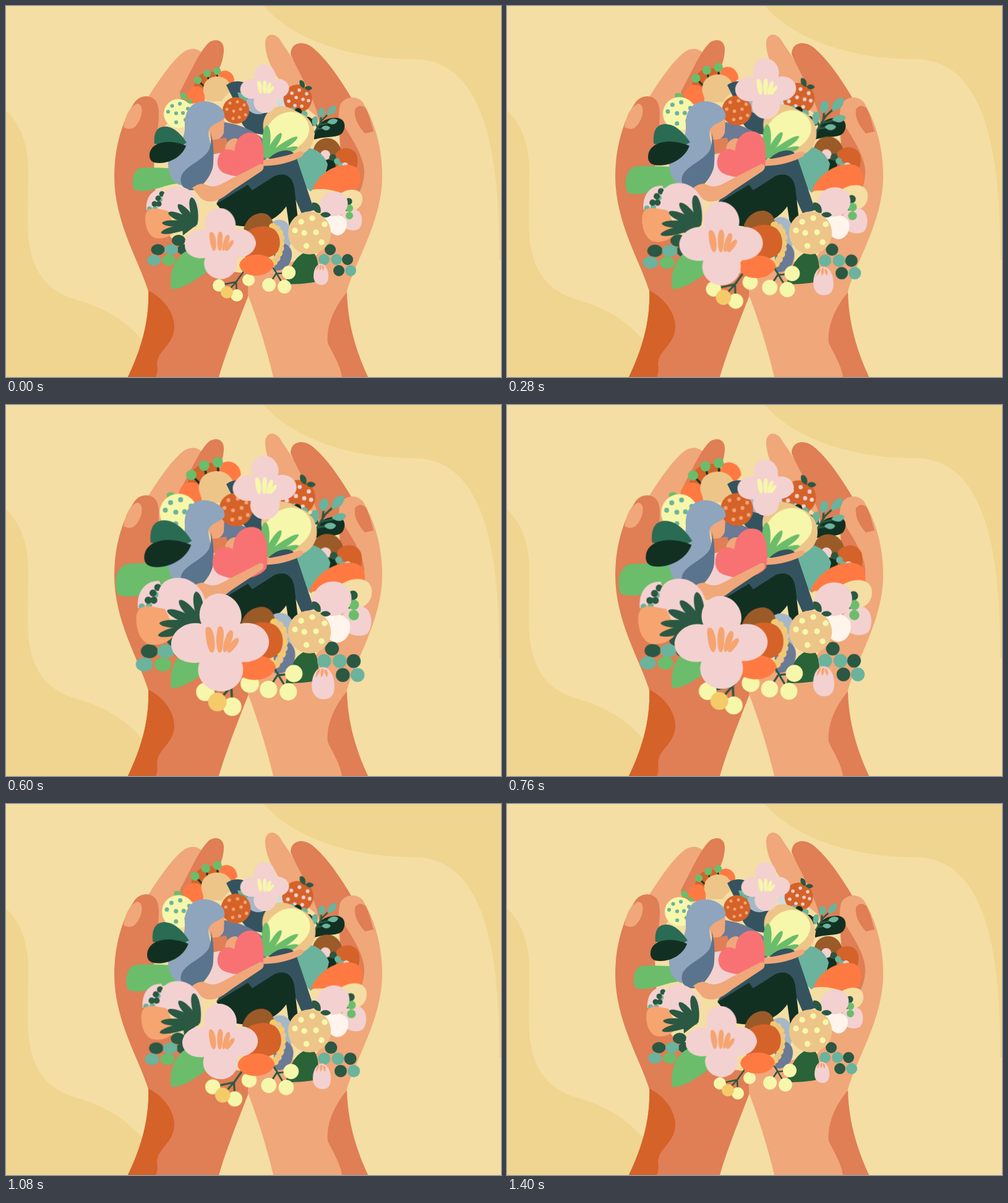
Write an HTML page that moves like this. It is 800 px wide and 600 px high and loops after 1.44 s.

```html
<!DOCTYPE html>
<html lang="en">
<head>
<meta charset="utf-8">
<title>Flowers in open hands</title>
<style>
html, body { margin: 0; width: 100%; height: 100%; overflow: hidden; background: #f4dea3; }
svg { display: block; width: 100vw; height: 100vh; }
path, ellipse, circle { fill: currentColor; }
.dot, .stem { fill: none; stroke: currentColor; stroke-linecap: round; }
.stem { stroke-width: 2.5; }

.sand { color: #efd58f; } .cream { color: #f4dea3; } .lemon { color: #f7f7ab; }
.amber { color: #f5cb6a; } .tan { color: #edc588; } .skin { color: #f0a77a; }
.clay { color: #e07e55; } .rust { color: #d56229; } .brown { color: #9a5b28; }
.orange { color: #ff7a42; } .peach { color: #f6a470; } .pink { color: #f3d1d0; }
.rose { color: #f87274; } .white { color: #fff5ec; } .green { color: #6bbd6b; }
.teal { color: #6bb39c; } .pine { color: #2a5842; } .jade { color: #2a6b53; }
.moss { color: #2a6338; } .night { color: #123022; } .navy { color: #34535e; }
.slate { color: #6b7a95; } .mist { color: #a5b8c8; } .hair { color: #8fa5bd; }
.lock { color: #5b748d; }

/* each part swells from its root, at 25 steps a second */
.main { animation: main 1440ms infinite; }
.bloom { animation: bloom 1440ms infinite; }
.top { animation: top 1440ms infinite; }
.sprig { animation: sprig 1440ms infinite; }
.love { animation: love 1440ms infinite; }
.bud { animation: bud 1440ms infinite; }
.leaf { animation: leaf 1440ms infinite; }
.seed { animation: seed 1440ms infinite; }
@keyframes main {
  0% { transform: scale(1); animation-timing-function: steps(16); }
  44.444% { transform: scale(var(--s)); animation-timing-function: steps(19); }
  97.222%, to { transform: scale(1); }
}
@keyframes bloom {
  0% { transform: scale(1); animation-timing-function: steps(16); }
  44.444% { transform: scale(var(--s)); animation-timing-function: steps(13); }
  80.556%, to { transform: scale(1); }
}
@keyframes top {
  0% { transform: scale(1); animation-timing-function: steps(12); }
  33.333% { transform: scale(var(--s)); animation-timing-function: steps(11); }
  63.889%, to { transform: scale(1); }
}
@keyframes sprig {
  0% { transform: scale(1); animation-timing-function: steps(11); }
  30.556% { transform: scale(var(--s)); animation-timing-function: steps(17); }
  77.778%, to { transform: scale(1); }
}
@keyframes love {
  0%, 11.111% { transform: scale(1); animation-timing-function: steps(11); }
  41.667% { transform: scale(var(--s)); animation-timing-function: steps(12); }
  75%, to { transform: scale(1); }
}
@keyframes bud {
  0% { transform: scale(1); animation-timing-function: steps(12); }
  33.333% { transform: scale(var(--s)); animation-timing-function: steps(23); }
  97.222%, to { transform: scale(1); }
}
@keyframes leaf {
  0% { transform: scale(1); animation-timing-function: steps(16); }
  44.444% { transform: scale(var(--s)); animation-timing-function: steps(17); }
  91.667%, to { transform: scale(1); }
}
@keyframes seed {
  0% { transform: scale(1); animation-timing-function: steps(15); }
  41.667% { transform: scale(var(--s)); animation-timing-function: steps(15); }
  83.333%, to { transform: scale(1); }
}
</style>
</head>
<body>
<svg viewBox="0 0 800 600" preserveAspectRatio="none">
<defs>
  <path id="petals" d="M-38-38C-50-64-34-100-2-100S52-64 41-38C72-46 100-26 100-1S74 42 44 40C55 66 36 100 2 100S-53 68-42 41C-74 46-100 28-100 3S-70-46-38-38Z"/>
  <g id="stamens">
    <path d="M-29-30C-22-36-15-28-12-10C-10 4-10 20-17 21C-26 20-32-20-29-30Z"/>
    <path d="M-3-32C4-36 9-28 7-10C6 8 5 21-1 21C-9 21-10-22-3-32Z"/>
    <path d="M21-25C28-25 28-16 24-5C19 10 13 22 8 20C2 16 12-22 21-25Z"/>
    <path d="M37-9C41-4 35 5 29 12C22 21 18 23 15 19C13 13 28-12 37-9Z"/>
  </g>
  <path id="frond" d="M-2 0C-6-14-9-46-1-50C7-48 8-16 2 0Z"/>
</defs>

<g class="sand">
  <path d="M417 0C455 45 540 86 660 86C750 87 799 180 797 410H800V0Z"/>
  <path d="M0 169C25 192 36 228 36 265L35 350C36 420 58 457 110 474C160 488 190 506 225 545L240 600H0Z"/>
</g>

<!-- left hand -->
<path class="skin" d="M222 160C240 130 265 92 285 76C296 67 309 67 318 77L292 150L248 206L236 190Z"/>
<path class="clay" d="M352 72C353 56 340 51 328 59C312 74 298 108 281 139L285 165L325 128C344 110 351 90 352 72Z"/>
<path class="clay" d="M230 461C215 412 175 350 175 275C175 230 188 185 207 157C216 143 237 142 244 157C251 173 244 205 240 235C238 275 240 310 252 350C275 400 330 430 393 432V465C377 507 357 555 344 600H197C218 556 232 510 230 461Z"/>
<path class="skin" d="M190 196C192 180 199 163 212 158C220 159 221 168 218 179C213 193 205 204 190 196Z"/>
<path class="rust" d="M230 460C257 474 272 498 272 519C271 549 245 556 244 579Q246 592 242 600H197C218 556 232 510 230 460Z"/>

<!-- right hand -->
<path class="skin" d="M419 64C417 43 436 40 445 58L463 85L506 150V182L480 160C440 125 421 92 419 64Z"/>
<path class="clay" d="M460 78C460 59 479 55 494 66C517 84 540 118 559 150L540 195L506 190C505 160 473 108 460 78Z"/>
<path class="skin" d="M391 430V467C409 515 422 558 432 600H585C564 555 552 510 550 465C561 418 608 350 608 275C608 230 597 190 577 156C566 143 546 147 540 160C535 182 538 210 541 240C544 300 530 370 500 405Z"/>
<path class="clay" d="M538 180C552 205 580 240 579 271C577 296 570 310 545 322Z"/>
<path class="clay" d="M564 167Q571 157 581 165C588 178 590 190 594 203L580 206C569 194 562 180 564 167Z"/>
<path class="clay" d="M551 463C529 489 517 520 520 545C528 562 540 580 543 600H585C564 555 552 510 551 463Z"/>

<!-- upper left -->
<g class="main" style="--s:1.34;transform-origin:336px 145px">
  <path class="rust" d="M304 131C306 111 324 102 342 108L350 140L315 145Z"/>
  <path class="orange" d="M345 107C356 100 369 108 369 121L360 131L340 125Z"/>
  <path class="orange" d="M293 151C291 137 300 129 309 130C318 130 323 137 321 155L300 158Z"/>
</g>
<g class="main" style="--s:1.4;transform-origin:338px 138px">
  <path class="stem night" stroke-width="2" d="M310 120L320 130M325 109L329 126M341 105L342 124"/>
  <path class="dot green" stroke-width="12.4" d="M310 120h0M325 109h0M341 105h0"/>
  <path class="green" d="M281 142C288 137 294 143 293 151C285 153 281 149 281 142ZM292 154Q300 146 302 156Q296 161 292 154Z"/>
</g>
<g class="main tan" style="--s:1.29;transform-origin:345px 140px">
  <path d="M319 139C317 122 329 114 342 114S365 124 364 139C356 143 351 149 349 154H324Z"/>
</g>
<g class="main" style="--s:1.32;transform-origin:277px 174px">
  <circle class="lemon" cx="278.500" cy="174" r="23.5"/>
  <path class="dot teal" stroke-width="6.2" d="M281 158h0M268.500 161.500h0M262 171h0M275 173.500h0M286 173h0M275 188h0M294 166h0M290 184h0"/>
</g>

<!-- behind the upper flower -->
<path class="navy" d="M356 128C370 117 390 120 405 140L440 178L416 208C394 206 382 198 378 180L366 148Z"/>
<path class="teal" d="M374 140C382 138 390 146 392 155L378 152Z"/>
<ellipse class="mist" cx="408" cy="158" rx="20" ry="17"/>
<circle cx="446" cy="156" r="9" color="#d5d9e0"/>

<!-- upper right -->
<g class="main" style="--s:1.24;transform-origin:471px 152px">
  <circle class="rust" cx="471.500" cy="150" r="23"/>
  <path class="dot pink" stroke-width="5.6" d="M462 141h0M474 136h0M486 142h0M457 154h0M469 148h0M480 151h0M489 153h0M478 162h0M467 161h0"/>
  <path class="pine" d="M475 120C481 119 485 126 482 133C475 131 473 125 475 120ZM483 133C485 127 493 129 495 133C491 138 486 137 483 133Z"/>
</g>
<g class="main" style="--s:1.2;transform-origin:482px 192px">
  <path class="dot teal" stroke-width="11" d="M463 169h0M482 175h0"/>
  <path class="dot night" stroke-width="12" d="M472 171h0M488 185h0M495 188h0"/>
</g>
<path class="night" d="M498 216C498 193 515 179 536 181C549 183 550 197 543 206C534 214 517 210 498 216Z"/>
<g class="sprig" style="--s:1.49;transform-origin:499px 202px">
  <path class="stem pine" stroke-width="1.8" d="M499 204L511 184L526 170M510 173L508 190M500 186L503 196M508 192L526 188M503 199L517 197"/>
  <g class="teal">
    <path d="M505 178C502 168 508 164 513 165C517 171 515 178 509 180ZM519 177C518 165 526 161 533 161C535 170 529 177 519 177ZM495 191C493 180 498 177 503 179C506 187 502 193 498 195Z"/>
    <path d="M519 188C524 181 533 181 536 185C533 193 525 193 519 188ZM510 197C514 192 522 193 524 197C521 203 513 202 510 197Z"/>
  </g>
</g>

<!-- right -->
<g class="main" style="--s:1.14;transform-origin:515px 255px">
  <path class="brown" d="M497 231C502 214 518 211 529 216C538 221 542 230 543 242L515 255Z"/>
  <path class="rust" d="M533 238C544 226 561 228 567 241C570 253 567 264 562 268L530 268Z"/>
  <path class="night" d="M508 246L532 250L533 266L518 270Z"/>
  <circle class="pink" cx="516" cy="241" r="8"/>
  <path class="dot pine" stroke-width="11" d="M528 245h0"/>
  <path class="dot teal" stroke-width="10" d="M535 251h0M541 258h0"/>
  <path class="dot pink" stroke-width="10" d="M548 258h0"/>
</g>
<path class="teal main" style="--s:1.13;transform-origin:485px 265px" d="M466 238C484 222 510 230 520 256C517 275 506 289 492 300C480 290 468 268 466 238Z"/>
<path class="orange main" style="--s:1.19;transform-origin:529px 268px" d="M495 297C505 273 527 257 552 257C568 257 574 269 572 283C568 301 555 304 540 302C523 296 510 295 495 297Z"/>
<g class="main" style="--s:1.42;transform-origin:537px 337px">
  <path class="cream" d="M538 305C553 293 576 294 576 312C576 326 564 333 547 334Z"/>
  <path class="pink" d="M541 341C546 329 560 325 569 331C577 337 577 353 571 360C562 366 550 362 545 356Z"/>
  <path class="white" d="M513 339C525 333 544 336 550 347C553 358 547 370 536 371C524 370 515 354 513 339Z"/>
  <path class="dot pine" stroke-width="11" d="M554 316h0M550 326h0"/>
  <path class="dot green" stroke-width="12" d="M555 327h0M555 339h0"/>
  <path class="pink" d="M506 329C506 309 518 300 532 300C546 301 554 311 552 323C549 336 539 340 528 340C518 340 511 334 506 329Z"/>
</g>

<!-- left leaf -->
<path class="green leaf" style="--s:1.44;transform-origin:272px 274px" d="M207 297C202 284 205 266 217 262C234 260 258 262 280 263L278 287C254 289 230 305 207 297Z"/>

<!-- figure -->
<path class="navy" d="M340 319L358 292L415 258C430 242 458 234 470 247L498 330L478 336L460 295L420 310Z"/>
<path class="night" d="M340 320L391 289L398 298L434 275C452 268 463 276 466 294L472 346L458 358L453 324C435 350 400 362 368 354Z"/>
<path class="slate" d="M338 186C378 189 408 204 423 224C427 238 423 250 412 254L345 240Z"/>
<g class="main" style="--s:1.09;transform-origin:450px 235px">
  <path class="tan" d="M416 200C413 180 425 164 443 162C459 162 467 170 477 174C493 181 500 198 498 213C495 230 484 239 470 242L425 247Z"/>
  <path class="lemon" d="M417 245C412 220 417 190 442 176C467 163 491 178 490 201C488 223 460 241 417 245Z"/>
  <g class="green" transform="translate(419 245)">
    <use href="#frond" transform="rotate(4) scale(1.1 1.04)"/>
    <use href="#frond" transform="rotate(34) scale(.85 .95)"/>
    <use href="#frond" transform="rotate(58) scale(.85 1.24)"/>
    <use href="#frond" transform="rotate(73) scale(.8 1.1)"/>
  </g>
</g>
<path class="navy" d="M424 247C437 234 456 229 465 238L450 250Z"/>
<path class="skin" d="M408 250C436 247 461 240 476 235C483 236 482 242 475 245C455 256 429 259 408 259Z"/>
<path class="clay" d="M331 216L356 213L362 238L334 243Z"/>
<path class="pink" d="M334 240C355 234 390 235 412 253C390 276 355 296 324 291C325 272 335 261 334 240Z"/>
<path class="skin" d="M354 232C354 220 364 213 372 214C380 218 377 232 370 236Z"/>
<path class="skin" d="M327 197L353 181L352 205C348 216 340 218 330 214Z"/>
<g class="main" style="--s:1.28;transform-origin:372px 169px">
  <circle class="rust" cx="371.500" cy="169" r="21.5"/>
  <path class="dot peach" stroke-width="5" d="M362 157h0M374 155h0M385 160h0M357 167h0M368 170h0M379 167h0M367 182h0M377 180h0M387 176h0"/>
</g>
<path class="hair" d="M289 195C287 166 304 153 322 154C344 156 356 170 353 181C346 189 333 190 328 200C325 215 336 230 335 255C333 275 315 298 300 298C290 298 284 290 284 290C269 287 261 270 262 250C265 230 290 225 289 195Z"/>
<path class="lock" d="M331 205C337 225 336 250 334 262C328 281 312 298 300 298C288 298 280 288 283 276C289 258 318 251 328 233C332 222 332 212 331 205Z"/>
<path class="rose love" style="--s:1.19;transform-origin:384px 244px" d="M371 224C376 207 393 200 406 208C417 217 418 239 415 261C401 278 370 279 350 269C337 260 341 240 351 234C358 230 365 232 369 235Z"/>
<path class="skin" d="M301 294C310 287 318 286 323 289C336 296 349 288 361 281L410 256C418 254 418 263 413 267L365 299C348 313 332 322 316 312Z"/>

<g class="main" style="--s:1.3;transform-origin:262px 225px">
  <path class="jade" d="M240 223C238 202 246 194 259 195C273 196 285 210 292 221L275 230Z"/>
  <path class="night" d="M232 244C231 229 243 221 259 220C271 219 284 223 291 226C285 243 266 254 248 254C238 254 233 251 232 244Z"/>
</g>

<!-- lower left -->
<g class="seed" style="--s:1.25;transform-origin:301px 377px">
  <g class="pine"><ellipse cx="245.500" cy="394" rx="11" ry="9"/><ellipse cx="279" cy="379" rx="11" ry="9"/><ellipse cx="288" cy="394" rx="11" ry="9"/></g>
  <g class="teal"><ellipse cx="267" cy="394" rx="11" ry="9"/><ellipse cx="239" cy="411" rx="11" ry="9"/></g>
  <ellipse class="green" cx="263" cy="411" rx="11" ry="9"/>
</g>
<path class="green" d="M267 458C262 428 278 398 298 394L350 418C324 424 297 458 267 458Z"/>
<g class="main" style="--s:1.31;transform-origin:275px 335px">
  <path class="pink" d="M227 330C225 309 237 295 254 296L270 340Z"/>
  <path class="dot teal" stroke-width="8" d="M249 313h0M232 328h0M241 327h0"/>
  <path class="dot pine" stroke-width="9" d="M252 304h0M246 311h0M240 320h0M247 320h0"/>
  <path class="pink" d="M253 309C257 294 271 290 286 293C302 298 313 313 312 330C309 346 288 352 270 343C259 336 252 321 253 309Z"/>
  <path class="peach" d="M225 343C225 330 233 326 245 328L261 331L275 360C268 374 251 378 240 375C229 370 225 356 225 343Z"/>
</g>
<g class="main pine" style="--s:1.26;transform-origin:270px 342px">
  <g transform="translate(307 354)">
    <use href="#frond" transform="rotate(-8) scale(1.05 .9)"/>
    <use href="#frond" transform="rotate(-40) scale(1 .88)"/>
    <use href="#frond" transform="rotate(-65) scale(1 .98)"/>
    <use href="#frond" transform="rotate(-86) scale(.9 1.1)"/>
    <use href="#frond" transform="rotate(-102) scale(.9 1.16)"/>
  </g>
  <path d="M308 335V354L286 371L284 350L298 338Z"/>
</g>

<!-- lower right -->
<path class="moss" d="M452 450C458 420 471 399 490 397C502 397 506 412 505 445C490 449 470 450 452 450Z"/>
<g class="main" style="--s:1.27;transform-origin:513px 394px">
  <path class="dot teal" stroke-width="18" d="M514 410h0M534 410h0M557 428h0"/>
  <path class="dot pine" stroke-width="18" d="M524 394h0M552 410h0M538 428h0"/>
</g>
<g class="bud" style="--s:1.61;transform-origin:502.500px 404px">
  <path class="pink" d="M497 437C497 424 503 417 509 417S521 425 521 437S515 451 509 451S497 446 497 437Z"/>
  <path class="peach" d="M501 428Q502 419 506 419Q505 424 501 428ZM507 428Q505 419 509 418Q511 424 507 428ZM513 428Q509 421 511 419Q516 422 513 428Z"/>
</g>

<!-- bottom centre -->
<g class="main" style="--s:1.21;transform-origin:435px 395px">
  <path class="mist" d="M428 351C440 341 457 346 460 362C464 378 459 392 452 400L430 390Z"/>
  <path class="slate" d="M432 384C446 379 463 386 462 403C461 420 448 430 434 427Z"/>
</g>
<g class="main" style="--s:1.53;transform-origin:388px 428px">
  <path class="stem pine" stroke-width="2" d="M388 424L372 446M344 452L372 446L357 463M372 446L373 466"/>
  <path class="dot lemon" stroke-width="20" d="M344 452h0M373 468h0M392 443h0"/>
  <path class="dot amber" stroke-width="20" d="M357 463h0"/>
</g>
<g class="main" style="--s:1.3;transform-origin:428px 419px">
  <path class="stem pine" d="M432 424L438 433L457 431M426 449L437 432L449 452"/>
  <path class="dot lemon" stroke-width="22" d="M457 431h0M425 451h0M450 454h0"/>
</g>
<g class="main" style="--s:1.18;transform-origin:415px 385px">
  <path class="brown" d="M384 361C389 341 404 334 416 335C426 337 432 345 432 357L405 372Z"/>
  <path class="dot amber" stroke-width="12" d="M431 357h0M442 367h0M444 384h0M441 400h0M433 414h0"/>
  <path class="dot tan" stroke-width="11" d="M438 360h0M445 375h0M444 392h0M438 408h0"/>
  <path class="rust" d="M385 370C396 356 420 352 433 361C444 370 445 386 439 397C429 410 406 410 387 409Z"/>
  <path class="orange" d="M377 419C379 408 392 402 406 402C420 402 432 409 433 419C429 430 417 436 404 436C390 436 379 430 377 419Z"/>
</g>

<circle class="tan" cx="490.500" cy="367" r="34.7"/>
<path class="dot lemon" stroke-width="9.5" d="M477 349h0M495 343h0M515 353h0M467 363h0M482 367h0M501 366h0M485.500 388h0M510 382h0"/>
<path class="pine" d="M495 318C504 316 511 325 508 335C499 335 494 328 495 318ZM508 337C514 331 522 333 525 338C520 344 512 343 508 337Z"/>

<!-- large blooms -->
<g class="bloom" style="--s:1.4;transform-origin:346px 384px">
  <g transform="translate(346 384) scale(.575)">
    <use href="#petals" class="pink"/><use href="#stamens" class="peach"/>
  </g>
</g>
<g class="top" style="--s:1.42;transform-origin:418px 133.500px">
  <g transform="translate(418 133.500) scale(.395)">
    <use href="#petals" class="pink"/><use href="#stamens" class="lemon"/>
  </g>
</g>
</svg>
</body>
</html>
```
